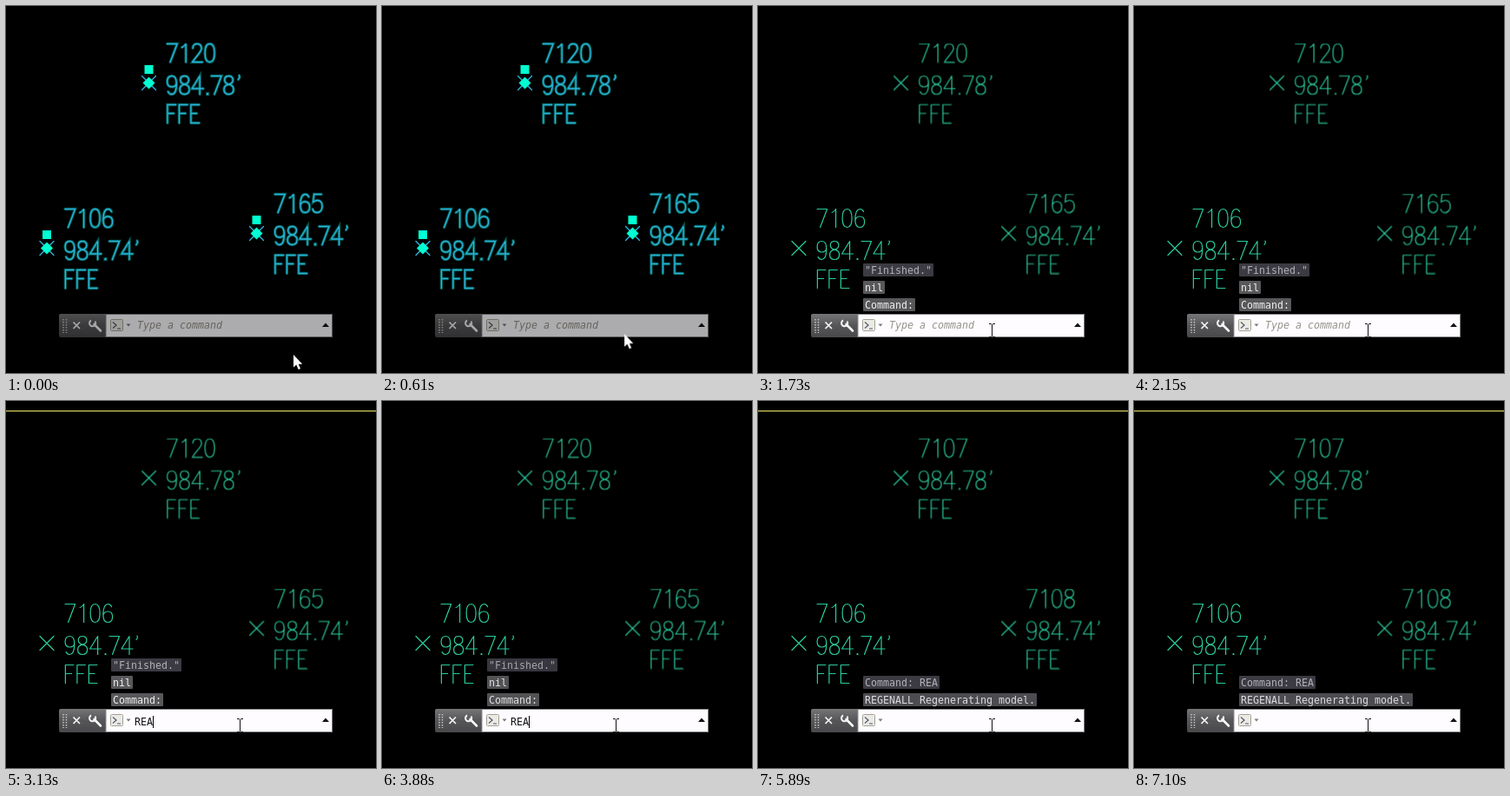
Write an HTML page that moves like this. It is 426 by 422 pixels and loops after 7.2 s.

```html
<!DOCTYPE html>
<html lang="en">
<head>
<meta charset="utf-8">
<title>Condensing point numbers</title>
<style>
html, body { margin: 0; width: 100%; height: 100%; overflow: hidden; background: #000; }
svg { position: absolute; left: 0; top: 0; }
#stage { position: absolute; left: 0; top: 0; width: 426px; height: 422px; overflow: hidden;
  font: 11.63px/26px "DejaVu Sans Mono", "Noto Sans Mono", monospace; }
#stage div { position: absolute; white-space: pre; }

/* one shared clock: 1% = 72 ms */
.t { animation: 7200ms step-end infinite; }

.ink { fill: none; stroke: #2acb9c; stroke-width: 1.2; stroke-linecap: round; stroke-linejoin: round; }
.halo { fill: none; stroke: #067a70; stroke-width: 3.4; stroke-linecap: round; opacity: .75; filter: blur(.7px); }
.picked .ink { stroke: #2bb4dd; stroke-width: 1.35; }
.grip { fill: #00ffd2; }

.picked { animation-name: picked; }
.plain { animation-name: plain; }
.old { animation-name: old; }
.new { animation-name: new; }
.edge { animation-name: edge; }
#bar { animation-name: wake; }
.prompt { animation-name: prompt; }
.regen { animation-name: regen; }
.ibeam { animation-name: ibeam; }
.arrow { animation-name: arrow; }

@keyframes picked { 0% { opacity: 1 } 23% { opacity: 0 } }
@keyframes plain { 0% { opacity: 0 } 23% { opacity: 1 } }
@keyframes old { 0% { opacity: 1 } 70.8% { opacity: 0 } }
@keyframes new { 0% { opacity: 0 } 70.8% { opacity: 1 } }
@keyframes edge {
  0% { opacity: 0 } 11.1% { opacity: 1 } 22.3% { opacity: 0 }
  39% { opacity: 1 } 49.5% { opacity: 0 } 70.8% { opacity: 1 }
}
@keyframes wake { 0% { opacity: .68 } 10% { opacity: 1 } }
@keyframes prompt { 0% { opacity: 1 } 63.9% { opacity: 0 } 70.8% { opacity: 1 } }
@keyframes regen { 0% { opacity: 0 } 63.9% { opacity: 1 } 70.8% { opacity: 0 } }
@keyframes ibeam { 0% { opacity: 0 } 10% { opacity: 1 } }
@keyframes arrow {
  0% { transform: translate(331px, 401px); opacity: 1 }
  4.5% { transform: translate(331px, 401px); opacity: 1; animation-timing-function: ease-in-out }
  9.95% { transform: translate(270px, 373px); opacity: 1 }
  10%, 100% { transform: translate(270px, 373px); opacity: 0 }
}

.hint { left: 151px; top: 354px; font-style: italic; color: #95938a; animation-name: hint; }
.bold { left: 151px; top: 354px; font-weight: bold; color: #111; }
.typed { left: 148px; top: 362px; height: 14px; line-height: 14px; overflow: hidden;
  color: #111; border-right: 1px solid #000; }
.condense { animation-name: condense; }
.rea { animation-name: rea; }
@keyframes hint { 0% { opacity: 1 } 11.1% { opacity: 0 } 23.6% { opacity: 1 } 39.5% { opacity: 0 } }
@keyframes condense {
  0% { width: 0; opacity: 0 }
  11.1% { width: 0; opacity: 1; animation-timing-function: steps(15) }
  16.4% { width: 105px; opacity: 1 }
  22.9%, 100% { width: 105px; opacity: 0 }
}
@keyframes rea {
  0% { width: 0; opacity: 0 }
  39.5% { width: 7px; opacity: 1 }
  41% { width: 14px; opacity: 1 }
  42.4% { width: 21px; opacity: 1 }
  63.9%, 100% { width: 21px; opacity: 0 }
}

.log { left: 121px; padding: 0 2px; height: 15px; line-height: 17px; border-radius: 1px;
  color: #f0eff2; background: #58575a; }
.faint { color: #b2b0b6; background: #3c3a42; }
.first { animation-name: first; }
.model { color: #dddce0; background: #4c4b4f; animation-name: model; }
@keyframes first {
  0% { opacity: 0 } 23.6% { opacity: 1 }
  53.5% { opacity: 1; animation-timing-function: linear }
  60.5%, 100% { opacity: 0 }
}
@keyframes model { 0% { opacity: 0 } 63.9% { opacity: 1 } }
</style>
</head>
<body>
<div id="stage">
  <svg width="426" height="422">
    <g id="drawing"></g>
    <rect class="t edge" y="11" width="426" height="1" fill="#f2ec6c"/>
  </svg>

  <div class="log faint t first" style="top:296px">"Finished."</div>
  <div class="log t first" style="top:316px">nil</div>
  <div class="log t first" style="top:336px">Command:</div>
  <div class="log faint t new" style="top:316px">Command: REA</div>
  <div class="log t model" style="top:336px">REGENALL Regenerating model.</div>

  <div id="bar" class="t" style="width:426px;height:422px">
    <svg width="426" height="422">
      <defs>
        <linearGradient id="metal" x2="0" y2="1">
          <stop stop-color="#757476"/><stop offset=".5" stop-color="#565558"/><stop offset="1" stop-color="#49484a"/>
        </linearGradient>
      </defs>
      <rect x="61" y="354" width="315" height="27" rx="2" fill="url(#metal)"/>
      <rect x="115" y="354.5" width="260.5" height="26" fill="#fefcff" stroke="#858388"/>
      <path d="M66 360V376M69.5 360V376" stroke="#c9c8c6" stroke-width="1.5" stroke-dasharray="1.5 1.5"/>
      <path d="M77.5 363.5L85 371M85 363.5L77.5 371" stroke="#f6f6f6" stroke-width="1.7"/>
      <path d="M101.5 366L109 373.5" stroke="#f6f6f6" stroke-width="2.6" stroke-linecap="round"/>
      <path d="M98 361.5A3.6 3.6 0 1 0 102.5 362.5" fill="none" stroke="#f6f6f6" stroke-width="2"/>
      <g class="t prompt">
        <rect x="120.5" y="360.5" width="14" height="13" rx="1" fill="#ebebe6" stroke="#a3a296"/>
        <path d="M123 363.5L127 367L123 370.5M128 371H132" fill="none" stroke="#55566a" stroke-width="1.2"/>
      </g>
      <g class="t regen" fill="none">
        <path d="M120.5 361.5H127M120.5 367.5H127M120.5 373.5H134.5M121 362V374M134 368V374" stroke="#a8a8a4" stroke-dasharray="3 1.5"/>
        <path d="M128.5 364.5A4 4 0 0 1 134 361.5M135.5 364A4 4 0 0 1 130 368" stroke="#a3a35c" stroke-width="1.3"/>
        <path d="M133 359L136 362L133 364ZM131 365.5L128 368L131 370.5Z" fill="#a3a35c"/>
      </g>
      <path d="M138.5 365.5H143.5L141 368.5Z" fill="#77767a"/>
      <path d="M364 369H372L368 364.5Z" fill="#111"/>
    </svg>
    <div class="hint t">Type a command</div>
    <div class="typed t condense">CONDENSE_POINTS</div>
    <div class="typed t rea">REA</div>
    <div class="bold t regen">REGENALL</div>
  </div>

  <svg width="426" height="422">
    <path class="t ibeam" d="M266 365.5H268.5L269.5 366.5L270.5 365.5H273M269.5 366V380M266 380.5H268.5L269.5 379.5L270.5 380.5H273" fill="none" stroke="#111"/>
    <path class="t arrow" d="M0 0V14.5L3.3 11.5L5.7 17L8 16L5.7 10.7H10.2Z" fill="#fff"/>
  </svg>
</div>

<script>
// CAD stroke lettering: pen paths on a 21-unit cap height
const pen = {
  0: "M6 0C2.5 0 .5 4 .5 10.5S2.5 21 6 21 11.5 17 11.5 10.5 9.5 0 6 0Z",
  1: "M3 4Q6 3 7.5 0V21",
  2: "M1 5C1 1.5 3 0 6 0S11 2 11 5.5C11 9 6 13 .5 21H12",
  4: "M9 21V0L0 14.5H13",
  5: "M10.5 0H2L1 9C3 7.5 4 7 6 7C9.5 7 11.5 10 11.5 14S9 21 5.5 21 1 19.5 .5 17",
  6: "M10.5 3C9.5 1 8.5 0 6.5 0C2.5 0 .8 5 .8 12C.8 18 2.5 21 6 21S11.5 18.5 11.5 14.5 9.5 8.5 6 8.5 .8 11 .8 14",
  7: "M.5 0H12L4 21",
  8: "M6 0C3 0 1.2 1.8 1.2 4.6S3 9 6 9.6 11.5 12 11.5 15.3 9.5 21 6 21 .5 18.5 .5 15.3 3 10.2 6 9.6 10.8 7.5 10.8 4.6 9 0 6 0Z",
  9: "M1.5 18C2.5 20 3.5 21 5.5 21C9.5 21 11.2 16 11.2 9C11.2 3 9.5 0 6 0S.5 2.5 .5 6.5 2.5 12.5 6 12.5 11.2 10 11.2 7",
  ".": "M3 20.2h.8v.8h-.8z",
  "'": "M3.5 -.5L4 1.5L2.5 4",
  F: "M.8 21V0H10.3M.8 10H8",
  E: "M.8 21V0H10.3M.8 10H7.5M.8 21H10.3"
};
const advance = { ".": 7.4, F: 13.5, E: 13.5 };

function write(text, y, lit, cls = "") {
  let x = 20.6, out = "";
  for (const c of text) {
    const at = `d="${pen[c]}" transform="translate(${x} ${y})"`;
    if (lit) out += `<path class="halo" ${at}/>`;
    out += `<path class="ink" ${at}/>`;
    x += advance[c] || 14.5;
  }
  return `<g role="img" aria-label="${text}" class="${cls}">${out}</g>`;
}

function point([x, y, elev, before, after], lit) {
  const changes = !lit && after;
  return `<g transform="translate(${x} ${y})">`
    + `<path class="ink" d="M-8 -8L8 8M8 -8L-8 8"/>`
    + (lit ? `<path class="grip" d="M0 -7L7 0L0 7L-7 0Z"/><rect class="grip" x="-5" y="-20.5" width="10" height="10"/>` : "")
    + write(before, -45, lit, changes ? "t old" : "")
    + (changes ? write(after, -45, lit, "t new") : "")
    + write(elev, -8, lit) + write("FFE", 25, lit) + "</g>";
}

const points = [
  [164.5, 88.5, "984.78'", "7120", "7107"],
  [288.5, 261.5, "984.74'", "7165", "7108"],
  [47, 278.5, "984.74'", "7106"]
];
const layer = (cls, lit) => `<g class="t ${cls}">${points.map(p => point(p, lit)).join("")}</g>`;
document.getElementById("drawing").innerHTML = layer("picked", true) + layer("plain", false);
</script>
</body>
</html>
```
